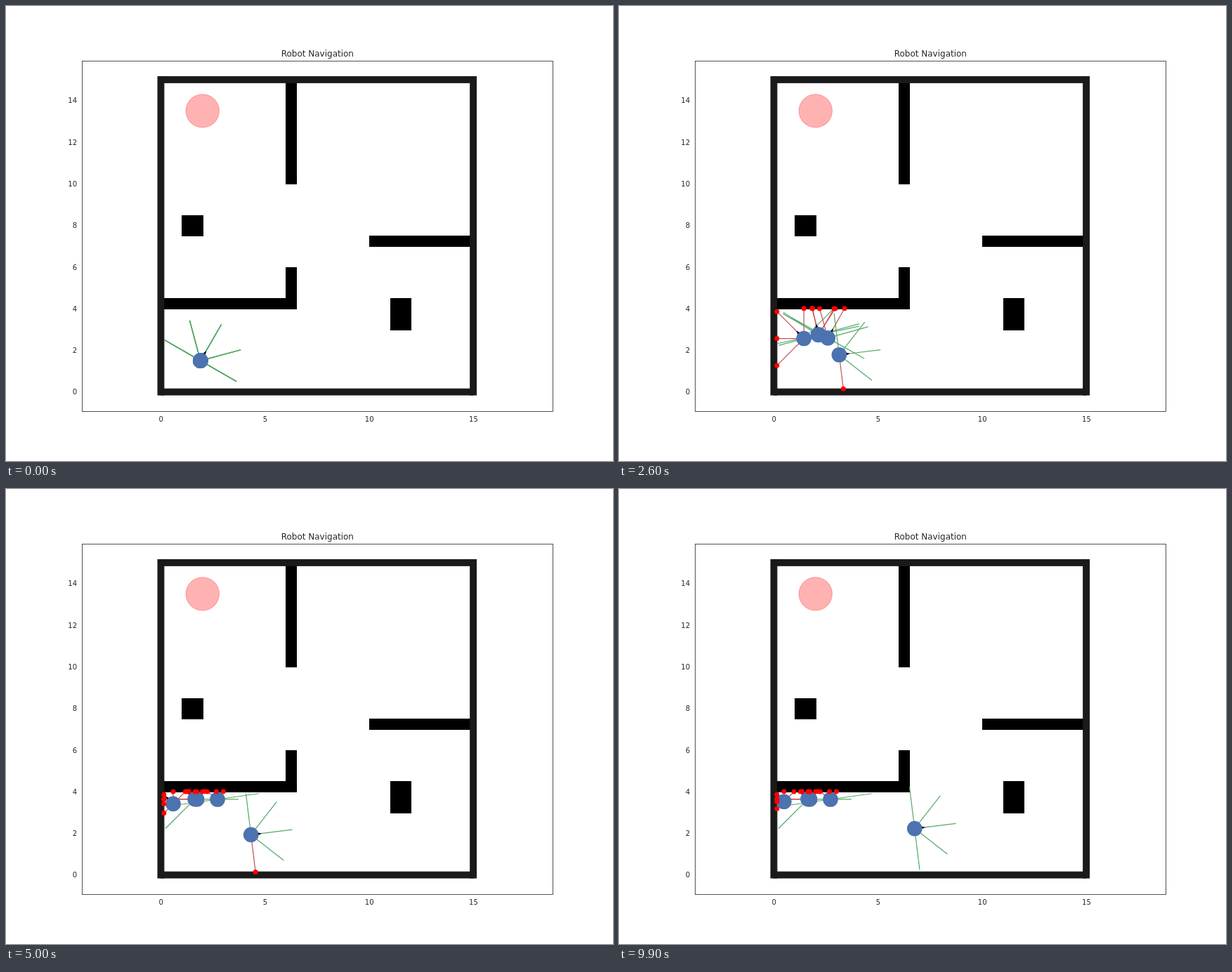
These frames come from a looping animation (864x648 px, 10 s). An HTML page with a canvas:

```html
<!DOCTYPE html>
<html lang="en">
<head>
<meta charset="utf-8">
<title>Robot Navigation</title>
<style>
html, body { margin: 0; width: 100%; height: 100%; overflow: hidden; background: #fff; }
canvas { display: block; }
</style>
</head>
<body>
<canvas id="stage" width="864" height="648"></canvas>
<script>
const ctx = document.getElementById('stage').getContext('2d');
const STEP_MS = 100, STEPS = 100;

// Map units: metres, y up
const SIZE = 15, WALL = 0.15, SPEED = 0.05, RANGE = 2, RADIUS = 0.365, CLEARANCE = 0.33;
const UNIT = 29.647;
const px = x => 220.45 + x * UNIT;
const py = y => 549.6 - y * UNIT;
const snap = v => Math.round(v) + 0.5;

// Left, bottom, right, top
const obstacles = [
  [6, 10, 6.5, 15], [1, 7.5, 2, 8.5], [10, 7, 15, 7.5],
  [6, 4, 6.5, 6], [0, 4, 6.5, 4.5], [11, 3, 12, 4.5]
];
const room = [WALL, WALL, SIZE - WALL, SIZE - WALL];

// Each robot steers through [step, heading in degrees], starting from one shared pose
const START = { x: 1.9, y: 1.5, heading: 60 };
const steering = [
  [[3, 95], [14, 95], [18, 160], [25, 135]],
  [[9, 67], [18, 93], [34, 111], [44, 135]],
  [[4, 74], [18, 75], [34, 135], [47, 90]],
  [[9, 44], [18, 72], [22, 60], [34, 62], [36, 98]],
  [[6, 7]]
];

const inside = ([l, b, r, t], x, y) => x > l && x < r && y > b && y < t;
const blocked = (x, y) => !inside(room, x, y) || obstacles.some(o => inside(o, x, y));
const collides = (x, y) => [-CLEARANCE, CLEARANCE].some(d => blocked(x + d, y) || blocked(x, y + d));

function headingAt(keys, step) {
  let [s0, h0] = [0, START.heading];
  for (const [s1, h1] of keys) {
    if (step < s1) {
      h0 += (h1 - h0) * (step - s0) / (s1 - s0);
      break;
    }
    [s0, h0] = [s1, h1];
  }
  return h0 * Math.PI / 180;
}

// Drive at constant speed; a robot that would touch a wall stays put
function simulate(keys) {
  let { x, y } = START;
  return Array.from({ length: STEPS }, (_, step) => {
    const pose = { x, y, heading: headingAt(keys, step) };
    const course = headingAt(keys, step + 0.5);
    const nx = x + SPEED * Math.cos(course), ny = y + SPEED * Math.sin(course);
    if (!collides(nx, ny)) [x, y] = [nx, ny];
    return pose;
  });
}
const tracks = steering.map(simulate);

function castRay({ x, y }, angle) {
  const c = Math.cos(angle), s = Math.sin(angle);
  let d = 0;
  while (d < RANGE && !blocked(x + c * d, y + s * d)) d += 0.01;
  return { x: x + c * d, y: y + s * d, hit: d < RANGE };
}

function disc(x, y, r, color) {
  ctx.fillStyle = color;
  ctx.beginPath();
  ctx.arc(px(x), py(y), r, 0, 2 * Math.PI);
  ctx.fill();
}

function block([l, b, r, t], color, place = v => v) {
  const x = place(px(l)), y = place(py(t));
  const box = [x, y, place(px(r)) - x, place(py(b)) - y];
  ctx.fillStyle = ctx.strokeStyle = color;
  ctx.fillRect(...box);
  ctx.strokeRect(...box);
}

function text(str, x, y, size, align) {
  ctx.font = `${size}px "DejaVu Sans", sans-serif`;
  ctx.textAlign = align;
  ctx.fillText(str, x, y);
}

function drawMap() {
  ctx.fillStyle = '#fff';
  ctx.fillRect(0, 0, 864, 648);
  ctx.strokeStyle = ctx.fillStyle = '#262626';
  ctx.lineWidth = 0.8;
  ctx.strokeRect(108.5, 78.5, 670, 499);
  text('Robot Navigation', 443.3, 72, 12, 'center');
  for (let v = 0; v < SIZE; v += 2) text(v, 101, Math.round(py(v) + 3.8), 10, 'right');
  for (let v = 0; v <= SIZE; v += 5) text(v, px(v) + 0.3, 592, 10, 'center');

  ctx.lineWidth = 1;
  disc(2, 13.5, 0.8 * UNIT, 'rgba(255,0,0,.3)');
  ctx.strokeStyle = 'rgba(255,0,0,.3)';
  ctx.stroke();

  for (const o of obstacles) block(o, '#000', snap);
  for (const v of [0, SIZE]) {
    block([v - WALL, -WALL, v + WALL, SIZE + WALL], '#1a1a1a');
    block([0, v - WALL, SIZE, v + WALL], '#1a1a1a');
  }
}

function drawArrow({ x, y, heading }) {
  ctx.save();
  ctx.translate(px(x), py(y));
  ctx.rotate(-heading);
  ctx.fillStyle = '#000';
  ctx.beginPath();
  ctx.moveTo(15.5, 0);
  ctx.lineTo(10, -2);
  ctx.lineTo(10, 2);
  ctx.fill();
  ctx.restore();
}

function draw(step) {
  drawMap();
  const poses = tracks.map(track => track[step]);
  const hits = [];
  ctx.lineWidth = 1.2;
  for (const pose of poses) {
    for (let k = -2; k <= 2; k++) {
      const end = castRay(pose, pose.heading + k * Math.PI / 4);
      if (end.hit) hits.push(end);
      ctx.strokeStyle = end.hit ? '#c44e52' : '#55a868';
      ctx.beginPath();
      ctx.moveTo(px(pose.x), py(pose.y));
      ctx.lineTo(px(end.x), py(end.y));
      ctx.stroke();
    }
  }
  poses.forEach(drawArrow);
  for (const { x, y } of poses) disc(x, y, RADIUS * UNIT, '#4c72b0');
  for (const { x, y } of hits) disc(x, y, 3.5, '#f00');
}

const began = performance.now();
function tick() {
  draw(Math.floor((performance.now() - began) / STEP_MS) % STEPS);
  requestAnimationFrame(tick);
}
tick();
</script>
</body>
</html>
```
